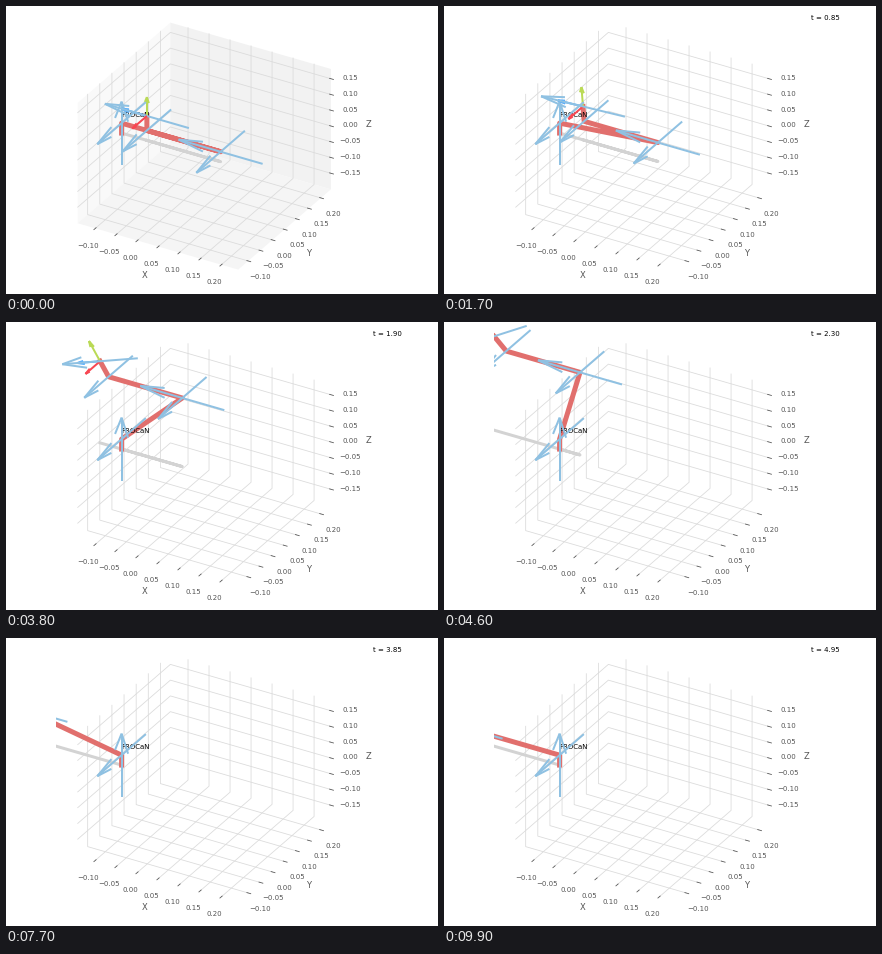
Recreate the animation shown at these times as a matplotlib script. Size 432 px wide and 288 px high, loop 10000 ms.

```python
import numpy as np
import matplotlib.pyplot as plt
from matplotlib.animation import FuncAnimation
from matplotlib.collections import LineCollection
from matplotlib.patches import Polygon, Rectangle

plt.rcParams["font.family"] = "DejaVu Sans"

W, H = 432, 288
STEPS, DT = 100, 0.05
GREY = "#555555"

# Orthographic view: azimuth -60, elevation 30, on a 4:4:3 box
CENTER = np.array([0.049, 0.05, -0.01])
SPAN = 0.382
KX = 185.33 / SPAN
KZ = 0.75 * KX
VIEW = np.array([
    [KX * 0.866, KX * 0.25],
    [KX * 0.5, -KX * 0.433],
    [0, -KZ * 0.866],
])
MIDDLE = np.array([198.3, 140.1])
TOWARDS_EYE = np.array([KX * 0.433, -KX * 0.75, KZ * 0.5])

XMIN, YMIN, ZMIN = CENTER - SPAN / 2
XMAX, YMAX, ZMAX = CENTER + SPAN / 2
TICK = 0.08 * SPAN

# Arm geometry
BASE = np.array([-0.119, 0, 0])
D1, UPPER, FORE, HAND = 0.0315, 0.2357, 0.1755, 0.046
AXIS_LEN, TOOL_LEN = 0.2, 0.06
AXIS_COLOR = "#8FC1E2"
TOOL_COLORS = ("#F84752", "#BADA55", "#54AEFF")


def project(points):
    return MIDDLE + (np.asarray(points, float) - CENTER) @ VIEW


fig = plt.figure(figsize=(W / 72, H / 72), dpi=72, facecolor="white")
ax = fig.add_axes([0, 0, 1, 1])
ax.set_xlim(0, W)
ax.set_ylim(H, 0)
ax.axis("off")
window = Rectangle((50.4, 0), 288, 288, transform=ax.transData)


def line(points, color, width, **kw):
    x, y = project(points).T
    return ax.plot(x, y, color=color, lw=width, **kw)[0]


def label(x, y, text, size=7, color=GREY, **kw):
    return ax.text(x, y, text, fontsize=size, color=color, **kw)


def wall(corners, shade):
    return ax.add_patch(Polygon(project(corners), fc=str(shade), ec="none", zorder=0))


def ticks(values, edge, outward, shift):
    """Tick marks and numbers; edge maps a value to its point on the box."""
    step = TICK * np.array(outward)
    for v in values:
        p = np.array(edge(v))
        line([p - 0.1 * step, p + 0.2 * step], GREY, 0.8, zorder=1.5)
        x, y = project(p) + shift
        label(x, y, f"{v:.2f}".replace("-", "\u2212"), ha="center", va="center")


panes = [
    wall([(XMIN, YMIN, ZMIN), (XMIN, YMAX, ZMIN), (XMIN, YMAX, ZMAX), (XMIN, YMIN, ZMAX)], 0.975),
    wall([(XMIN, YMAX, ZMIN), (XMAX, YMAX, ZMIN), (XMAX, YMAX, ZMAX), (XMIN, YMAX, ZMAX)], 0.95),
    wall([(XMIN, YMIN, ZMIN), (XMAX, YMIN, ZMIN), (XMAX, YMAX, ZMIN), (XMIN, YMAX, ZMIN)], 0.9625),
]

xy_ticks = np.arange(-2, 5) * 0.05
z_ticks = np.arange(-3, 4) * 0.05
grid = [[(v, YMIN, ZMIN), (v, YMAX, ZMIN), (v, YMAX, ZMAX)] for v in xy_ticks]
grid += [[(XMAX, v, ZMIN), (XMIN, v, ZMIN), (XMIN, v, ZMAX)] for v in xy_ticks]
grid += [[(XMIN, YMIN, v), (XMIN, YMAX, v), (XMAX, YMAX, v)] for v in z_ticks]
for path in grid:
    line(path, "#dbdbdb", 0.8, zorder=1)

ticks(xy_ticks, lambda v: (v, YMIN, ZMIN), (0, -1, 0), (-7.1, 17.5))
ticks(xy_ticks, lambda v: (XMAX, v, ZMIN), (1, 0, 0), (12.3, 15.8))
ticks(z_ticks, lambda v: (XMAX, YMAX, v), (1, 0, 0), (19.5, -0.5))
for x, y, name in [(138.5, 269, "X"), (303, 247, "Y"), (362, 118.5, "Z")]:
    label(x, y, name, size=8.4, ha="center", va="center")

shadow = line([BASE, BASE], "lightgrey", 3, zorder=2)
arm = line([BASE, BASE], "#E16F6D", 5, zorder=2.1)
arrows = LineCollection([], linewidths=2, zorder=4)
ax.add_collection(arrows, autolim=False)
for artist in (shadow, arm, arrows):
    artist.set_clip_path(window)

label(*project(BASE + [0, 0, 0.05]), "PROCaN", color="black", zorder=3)
clock = label(0.85 * W, 0.05 * H, "", color="black")


def arrow(tail, vec):
    """Shaft and two barbs, each turned 15 degrees off the shaft."""
    tail, vec = np.asarray(tail), np.asarray(vec)
    tip = tail + vec
    flat = np.hypot(vec[0], vec[1])
    hinge = np.array([vec[1], -vec[0], 0]) / flat if flat > 1e-9 else np.array([0, 1, 0])
    side = np.cross(hinge, vec)
    a = np.radians(15)
    barbs = [tip - 0.3 * (vec * np.cos(a) + s * side * np.sin(a)) for s in (1, -1)]
    return np.array([[tail, tip], [tip, barbs[0]], [tip, barbs[1]]])


def ease(s):
    return s ** 3 * (10 - 15 * s + 6 * s * s)


def pose(k):
    """Joint points and arrows; the forearm stays level while the arm swings over."""
    swing = np.pi * ease(k / (STEPS - 1))
    tilt = swing / 2
    up = np.array([-np.sin(tilt), 0, np.cos(tilt)])
    out = np.array([-np.cos(tilt), 0, -np.sin(tilt)])
    x, y, z = np.eye(3)

    shoulder = BASE + D1 * z
    elbow = shoulder + UPPER * np.array([np.cos(swing), 0, np.sin(swing)])
    wrist = elbow - FORE * x
    tool = wrist + HAND * up

    joints = [(BASE, z), (shoulder, -y), (elbow, -y), (elbow, -x), (wrist, -y), (tool, out)]
    items = [(arrow(p - d * AXIS_LEN / 2, d * AXIS_LEN), AXIS_COLOR) for p, d in joints]
    items += [(arrow(tool, d * TOOL_LEN), c) for d, c in zip((-y, up, out), TOOL_COLORS)]
    return np.array([BASE, shoulder, elbow, wrist, tool]), items


def draw(k):
    points, items = pose(k)
    arm.set_data(*project(points).T)
    shadow.set_data(*project(points * [1, 1, 0]).T)

    # far arrows first
    items.sort(key=lambda it: (it[0] @ TOWARDS_EYE).max())
    arrows.set_segments([project(seg) for segs, _ in items for seg in segs])
    arrows.set_color([c for segs, c in items for _ in segs])

    clock.set_text(f"t = {k * DT:.2f}" if k else "")
    for pane in panes:
        pane.set_visible(k == 0)
    return arm, shadow, arrows, clock


anim = FuncAnimation(fig, draw, frames=STEPS, interval=100, repeat=True, repeat_delay=0)
plt.show()
```
